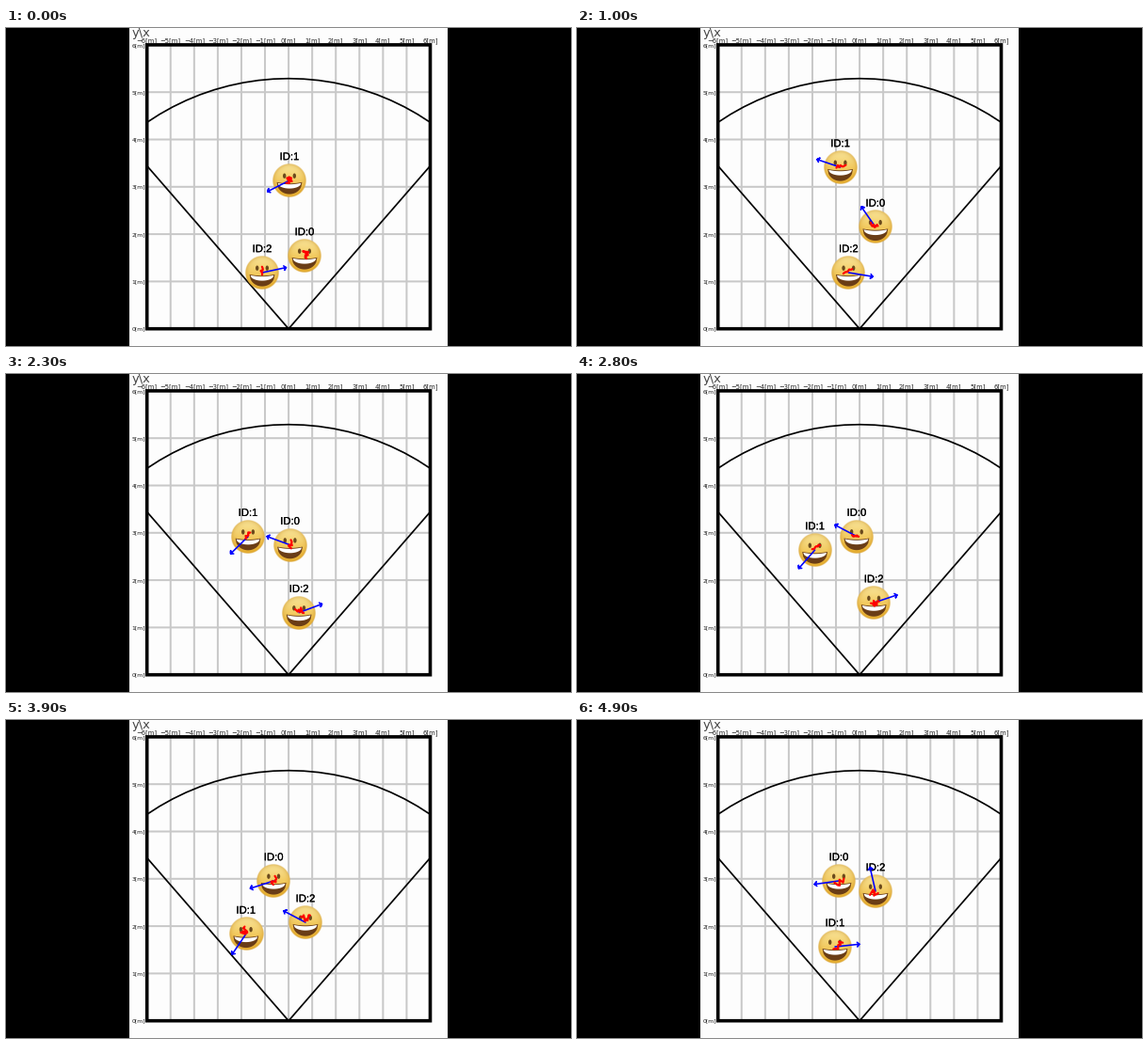
Write a matplotlib script that moves like this. It is 600x338 px and loops after 5000 ms.

```python
import numpy as np
import matplotlib.pyplot as plt
from matplotlib.animation import FuncAnimation
from matplotlib.patches import Ellipse, Polygon, Rectangle
from matplotlib.patheffects import withStroke
from matplotlib.transforms import Affine2D

W, H, DPI = 600, 338, 100
PX = 72 / DPI  # points per pixel
N_FRAMES, INTERVAL = 50, 100
CENTER, HALF, TOP, BOTTOM = 300.1, 150.4, 17.9, 319.7
RANGE = 266
RADIUS, ARROW = 18, 26

plt.rcParams["toolbar"] = "None"
fig = plt.figure(figsize=(W / DPI, H / DPI), dpi=DPI, facecolor="black")
ax = fig.add_axes([0, 0, 1, 1])
ax.axis("off")


def line(xs, ys, color, width, z, **kw):
    style = dict(solid_joinstyle="round", solid_capstyle="round", snap=False)
    return ax.plot(xs, ys, color=color, lw=width * PX, zorder=z, **{**style, **kw})[0]


def label(x, y, text, size, **kw):
    style = dict(ha="center", va="center", family="DejaVu Sans", color="#222222")
    return ax.text(x, y, text, fontsize=size * PX, **{**style, **kw})


def draw_chart():
    left, right = CENTER - HALF, CENTER + HALF
    ax.add_patch(Rectangle(((W - H) / 2, 0), H, H, color="#fdfdfd", lw=0, zorder=0))
    for i, x in enumerate(np.linspace(left, right, 13)):
        line([x, x], [TOP, BOTTOM], "#c8c8c8", 2, 1)
        label(x, 13.3, f"{i - 6}[m]".replace("-", "\u2212"), 6.8)
    for i, y in enumerate(np.linspace(BOTTOM, TOP, 7)):
        line([left, right], [y, y], "#c8c8c8", 2, 1)
        label(148, y, f"{i}[m]", 6.1, ha="right", va="center_baseline")
    label(143.8, 5.5, "y\\x", 13, color="#444444")

    a = np.linspace(-1, 1, 21) * np.arcsin(HALF / RANGE)
    line(CENTER + RANGE * np.sin(a), BOTTOM - RANGE * np.cos(a), "black", 1.7, 2)
    line([left, CENTER, right], [146.5, BOTTOM, 146.5], "black", 1.7, 2)
    ax.add_patch(Rectangle((left, TOP), 2 * HALF, BOTTOM - TOP, fill=False,
                           ec="black", lw=3.6 * PX, snap=False, zorder=3))


def face_image(n=144):
    """Golden ball, pale at the top and darker at the rim."""
    v, u = np.mgrid[-1:1:n * 1j, -1:1:n * 1j]
    r = np.hypot(u, v)
    light, mid, rim = (np.array(c) / 255 for c in ((250, 232, 160), (238, 184, 55), (205, 148, 40)))
    down = np.clip((v + 1) / 1.7, 0, 1)[..., None]
    edge = (np.clip(r, 0, 1) ** 7 * 0.6)[..., None]
    rgb = (light + (mid - light) * down) * (1 - edge) + rim * edge
    return np.dstack([rgb, np.clip((1 - r) * n / 4, 0, 1)])


class Person:
    def __init__(self, number, waypoints, moves_from=0):
        self.number, self.moves_from = number, moves_from
        self.path = np.array(waypoints, float)  # x, y, heading, evenly timed
        self.slopes = np.gradient(self.path, axis=0)
        self.move = Affine2D()
        self.draw_face(4 + number * 0.1)
        self.name = label(0, 0, f"ID:{number}", 11.3, family="Liberation Sans",
                          color="black", zorder=5,
                          path_effects=[withStroke(linewidth=0.2 * PX, foreground="black")])
        self.arrow = line([], [], "#0000ff", 1.6, 6)
        self.red = line([], [], "#ff0000", 2.2, 7)

    def draw_face(self, z):
        transform = self.move + ax.transData
        ax.imshow(face_image(), extent=(-RADIUS, RADIUS, RADIUS, -RADIUS), aspect="auto",
                  interpolation="bilinear", transform=transform, zorder=z)
        part = dict(transform=transform, zorder=z + 0.02, lw=0)
        for side in (-5.3, 5.3):
            ax.add_patch(Ellipse((side, -4.8), 3.4, 5.4, fc="#6b4a1c", **part))
        u = np.linspace(-1, 1, 31)
        top = 2.6 + 1.4 * (1 - u ** 2)
        bowl = np.sqrt(1 - u ** 2)

        def band(width, upper, lower, color):
            pts = np.column_stack([np.r_[u, u[::-1]] * width, np.r_[upper, lower[::-1]]])
            ax.add_patch(Polygon(pts, fc=color, **part))

        band(13.3, top - 0.7, 2.6 + 12 * bowl, "#6a3d16")
        band(12.3, top + 0.2, 3 + 5.6 * bowl, "#ffffff")

    def position(self, t):
        """Smooth curve through the waypoints."""
        last = len(self.path) - 1
        u = t / (N_FRAMES - 1) * last
        i = min(int(u), last - 1)
        s = u - i
        (a, b), (da, db) = self.path[i:i + 2, :2], self.slopes[i:i + 2, :2]
        ease = s * s * (3 - 2 * s)
        return a + (b - a) * ease + s * (1 - s) * (da * (1 - s) - db * s)

    def heading(self, t):
        return np.radians(np.interp(t, np.linspace(0, N_FRAMES - 1, len(self.path)),
                                    self.path[:, 2]))

    def update(self, t):
        here, angle = self.position(t), self.heading(t)
        self.move.clear().translate(*here)
        self.name.set_position(here - (0, 24.8))

        def ray(a, length):
            return length * np.array([np.cos(a), np.sin(a)])

        tip = here + ray(angle, ARROW)
        barbs = [tip - ray(angle + turn, 3.2) for turn in (-np.pi / 4, np.pi / 4)]
        self.arrow.set_data(*np.array([here, tip, barbs[0], tip, barbs[1]]).T)
        self.arrow.set_visible(t >= self.moves_from)

        # Sensor hits: a short zigzag near the middle of the face
        rng = np.random.default_rng(100 * self.number + t)
        middle = here + rng.normal((0.5, -1), 1.5)
        axis = ray(rng.uniform(-1.3, 0.5), 1)
        along = np.linspace(-1, 1, 8) * rng.uniform(3.5, 6.5)
        across = rng.uniform(1, 4) * rng.uniform(-1, 1, 8)
        self.red.set_data(middle[0] + along * axis[0] - across * axis[1],
                          middle[1] + along * axis[1] + across * axis[0])


draw_chart()
people = [
    Person(0, [(317, 242, -90), (317, 212, -124), (305, 189, -165),
               (295.5, 171, -150), (284, 171, -199), (278, 171, -188)], moves_from=1),
    Person(1, [(301, 162, 153), (280, 148, 200), (261.5, 164.5, 138),
               (252, 191.5, 130), (255, 228, 124), (274, 241, -6)]),
    Person(2, [(272, 260, -12), (288, 260, 10), (307, 258.5, -22),
               (316, 240, -18), (318, 214.5, -155), (317, 182, -103)]),
]
strays = {9: (334, 312), 18: (325, 65), 33: (354, 275), 40: (370, 108)}
stray = line([], [], "#ff0000", 1.8, 7, linestyle=(0, (2, 0.8)))
ax.set(xlim=(0, W), ylim=(H, 0))


def update(t):
    for person in people:
        person.update(t)
    x, y = strays.get(t, (-50, -50))
    stray.set_data([x - 3, x + 3], [y - 1, y + 1])
    return []


anim = FuncAnimation(fig, update, frames=N_FRAMES, interval=INTERVAL,
                     repeat=True, repeat_delay=0, blit=False)
plt.show()
```
